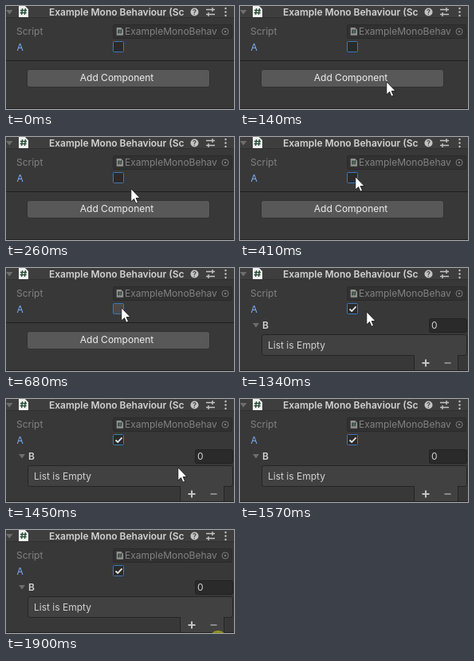
These frames come from a looping animation (286 px wide and 129 px high, 1.96 s). An HTML page:

```html
<!DOCTYPE html>
<html lang="en">
<head>
<meta charset="utf-8">
<title>Inspector checkbox</title>
<style>
  html, body { margin: 0; width: 100%; height: 100%; overflow: hidden; background: #383838; }
  svg { display: block; width: 286px; height: 129px; }
  text { font: 12px Inter, Roboto, sans-serif; fill: #d2d2d2; white-space: pre; }
  .bold { font-weight: 600; }
  .line { fill: none; stroke: #c4c4c4; }
  .light { fill: #c4c4c4; }
  .dim { fill: #828282; }
  .fold { fill: #6e6e6e; }
  .field { fill: #2a2a2a; stroke: #212121; }
  .panel { fill: #414141; stroke: #242424; }
</style>
</head>
<body>
<svg viewBox="0 0 286 129">
  <defs>
    <clipPath id="titleClip"><rect width="224" height="15"/></clipPath>
    <g id="script">
      <path d="M1 0H9L13 4V14H1Z" fill="#f0f0f0"/>
      <path d="M5.6 3L4.6 11M9.4 3L8.4 11M3 5.5H11M2.6 8.5H10.6" fill="none" stroke="#264d35" stroke-width="1.4"/>
    </g>
  </defs>
  <rect width="286" height="129" fill="#383838"/>

  <!-- Component header -->
  <rect width="286" height="14" fill="#3e3e3e"/>
  <rect y="14" width="286" height="1" fill="#303030"/>
  <path class="fold" d="M0 5H8.5L4.2 10.5Z"/>
  <use href="#script" x="15" y="0"/>
  <text class="bold" x="54" y="12" clip-path="url(#titleClip)">Example Mono Behaviour (Script)</text>
  <circle class="light" cx="236.5" cy="7.5" r="5"/>
  <text class="bold" x="236.5" y="11" text-anchor="middle" style="font-size:9px;fill:#3e3e3e">?</text>
  <path class="line" d="M251 4.5H262M251 10.5H262M259 2V7M254 8V13" stroke-width="1.4"/>
  <g class="light"><circle cx="275.5" cy="3" r="1.2"/><circle cx="275.5" cy="7.5" r="1.2"/><circle cx="275.5" cy="12" r="1.2"/></g>

  <!-- Script row -->
  <text class="dim" x="13" y="36">Script</text>
  <rect x="134.5" y="23.5" width="149" height="17" rx="2" fill="#313131" stroke="#2a2a2a"/>
  <use href="#script" transform="translate(138 27) scale(.7)" opacity=".5"/>
  <text class="dim" x="149" y="36">ExampleMonoBehav</text>
  <circle cx="275" cy="32" r="4" fill="none" stroke="#7b7b7b"/>
  <circle cx="275" cy="32" r="1.3" fill="#7b7b7b"/>

  <!-- Toggle row -->
  <text x="13.5" y="56" style="fill:#7baefa">A</text>
  <rect id="box" x="134.5" y="44.5" width="13" height="13" rx="1" stroke="#3a79bb"/>
  <path id="check" class="line" d="M137.5 51.5L140.2 54L145.5 48.3" stroke-width="1.8" style="stroke:#e4e4e4"/>

  <g id="closed">
    <rect y="68" width="286" height="1" fill="#1f1f1f"/>
    <rect x="26.5" y="79.5" width="229" height="22" rx="3" fill="#585858" stroke="#303030"/>
    <text x="139" y="94" text-anchor="middle" style="fill:#eee">Add Component</text>
  </g>

  <g id="open">
    <path class="fold" d="M16 69H24L20 74.5Z"/>
    <text class="bold" x="28" y="76">B</text>
    <rect class="field" x="237.5" y="63.5" width="47" height="17" rx="2"/>
    <text x="240" y="76">0</text>
    <path class="panel" d="M218.5 108V129H273.5V108Z"/>
    <rect class="panel" x="27.5" y="83.5" width="257" height="26" rx="3"/>
    <rect x="219" y="108" width="54" height="3" fill="#414141"/>
    <text x="35" y="101">List is Empty</text>
    <path class="line" d="M228.5 119H237.5M233 114.5V123.5" stroke-width="2"/>
    <path class="line" d="M256.5 119H264.5" stroke-width="2" style="stroke:#8a8a8a"/>
  </g>

  <rect y="128" width="286" height="1" fill="#232323"/>
  <circle id="glow" r="12" fill="#ff0" opacity=".47"/>
  <path id="cursor" d="M.8 .8V17L4.5 13.5L7 19.2L9.5 18.1L7.1 12.5H12Z" fill="#fff" stroke="#111" stroke-width=".8"/>
</svg>
<script>
const LOOP = 1960, ENTER = 30, REST = 410, CLICK = 570, PRESS = 600, RELEASE = 680, OPEN = 710,
  LEAVE = 1340, GONE = 1570, CLICK_BELOW = 1900;
const $ = id => document.getElementById(id);
const show = (id, on) => $(id).style.display = on ? '' : 'none';

// Pointer tip: decelerates in, rests on the toggle, sweeps out below the stage.
function pointer(t) {
  if (t < ENTER) return [216, 140];
  if (t < REST) {
    const left = 1 - Math.floor((t - ENTER) / (REST - ENTER) * 12) / 12;
    return [144 + 70 * left ** 2, 49 + 76 * left ** 1.86];
  }
  if (t < LEAVE) return [144, 49];
  if (t >= GONE) return [266, 138];
  const p = Math.floor((t - LEAVE) / (GONE - LEAVE) * 7) / 6;
  return [158 + 113 * p, 54 + 71 * p ** 1.2];
}

function draw(t) {
  const place = `translate(${pointer(t).map(Math.round)})`;
  $('cursor').setAttribute('transform', place);
  $('glow').setAttribute('transform', place);
  // The mouse button lights a halo; the inspector reacts slightly later.
  show('glow', t >= CLICK && t < RELEASE || t >= CLICK_BELOW);
  $('box').setAttribute('fill', t >= PRESS && t < OPEN ? '#494949' : '#2a2a2a');
  show('check', t >= OPEN);
  show('closed', t < OPEN);
  show('open', t >= OPEN);
}

const start = performance.now();
function tick() {
  draw((performance.now() - start) % LOOP);
  requestAnimationFrame(tick);
}
tick();
</script>
</body>
</html>
```
